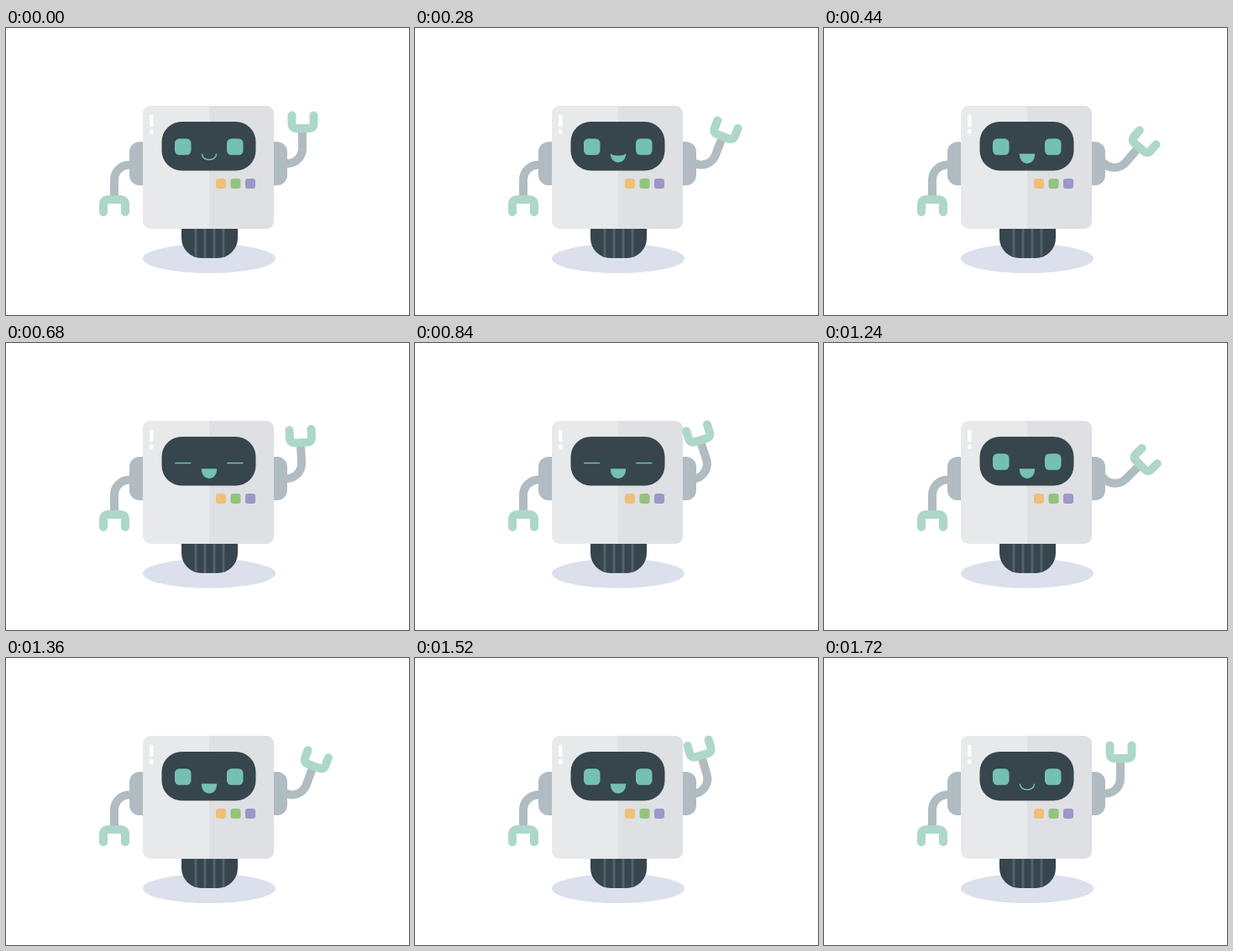
An HTML page that plays this animation: 480x343 px, repeating every 1920 ms.

```html
<!DOCTYPE html>
<html lang="en">
<head>
<meta charset="utf-8">
<title>Waving robot</title>
<style>
  html, body { margin: 0; width: 100%; height: 100%; overflow: hidden; background: #fff; }
  svg { display: block; width: 100vw; height: 100vh; }
  .dark { fill: #37454d; }
  .pad { fill: #b0bcc2; }
  .teal { fill: #74c1b3; }
  .limb, .claw { fill: none; stroke-width: 10; }
  .limb { stroke: #b0bcc2; }
  .claw { stroke: #add7c8; stroke-linecap: round; }
  #mouth { fill: #74c1b3; stroke: #74c1b3; stroke-width: 1.5; stroke-linecap: round; stroke-linejoin: round; }
</style>
</head>
<body>
<svg viewBox="0 0 480 343">
  <ellipse cx="242" cy="275.5" rx="79" ry="17.5" fill="#dbe0ec"/>

  <path class="dark" d="M209 236H276V251a24 24 0 0 1-24 24H233a24 24 0 0 1-24-24Z"/>
  <path d="M226 239V274M237 239V275M248 239V275M259 239V274" stroke="#53626a" stroke-width="3"/>

  <path class="pad" d="M164 136H159a12 12 0 0 0-12 12V176a12 12 0 0 0 12 12H164Z"/>
  <path class="pad" d="M318 136H323a12 12 0 0 1 12 12V176a12 12 0 0 1-12 12H318Z"/>

  <path class="limb" d="M152 163.5H147A18 18 0 0 0 129 181.500V205"/>
  <path class="claw" d="M116 220V211q0-6 6-6H136q6 0 6 6V220"/>

  <rect x="163" y="93" width="156" height="147" rx="9" fill="#e8e9eb"/>
  <path d="M242 93H310a9 9 0 0 1 9 9V231a9 9 0 0 1-9 9H242Z" fill="#dfe0e4"/>
  <g fill="#fff">
    <rect x="171" y="104" width="4.500" height="14" rx="1"/>
    <rect x="171" y="121" width="4.500" height="5.500" rx="1.500"/>
  </g>

  <rect class="dark" x="185.500" y="112" width="112" height="58.500" rx="24"/>
  <rect class="teal eye" x="201" width="19.500"/>
  <rect class="teal eye" x="263" width="19.500"/>
  <path id="mouth"/>

  <rect x="250" y="180" width="12" height="12" rx="3" fill="#f0c078"/>
  <rect x="267.500" y="180" width="12" height="12" rx="3" fill="#93c47d"/>
  <rect x="285" y="180" width="12" height="12" rx="3" fill="#9b97c8"/>

  <g id="arm">
    <path class="limb" d="M328 162H335A18 18 0 0 0 353 144V120"/>
    <path class="claw" d="M340.500 104.500V114q0 6 6 6H360.500q6 0 6-6V104.500"/>
  </g>
</svg>
<script>
  const LOOP = 1920, STEP = 40;

  // Tracks of [time in ms, value], eased between neighbours.
  const swing = [[160, 0], [400, 42], [820, -18], [1200, 47], [1560, -18], [1720, 0]];
  const lids = [[520, 1], [640, 0], [900, 0], [1020, 1]];
  const grin = [[160, 0], [360, 1], [1540, 1], [1720, 0]];

  const arm = document.getElementById('arm');
  const mouth = document.getElementById('mouth');
  const eyes = document.querySelectorAll('.eye');

  function valueAt(track, t) {
    const next = track.findIndex(key => key[0] > t);
    if (next < 0) return track[track.length - 1][1];
    if (next === 0) return track[0][1];
    const [t0, a] = track[next - 1];
    const [t1, b] = track[next];
    return a + (b - a) * (1 - Math.cos(Math.PI * (t - t0) / (t1 - t0))) / 2;
  }

  function draw(now) {
    // The movement advances at 25 poses per second.
    const t = Math.floor((now % LOOP) / STEP) * STEP;

    arm.setAttribute('transform', `rotate(${valueAt(swing, t)} 334 161)`);

    const open = valueAt(lids, t);
    const height = 1.5 + 18 * open;
    for (const eye of eyes) {
      eye.setAttribute('y', 142 + 1.5 * (1 - open) - height / 2);
      eye.setAttribute('height', height);
      eye.setAttribute('rx', Math.min(5.5, height / 2));
    }

    const m = valueAt(grin, t);
    const top = 151 + 8.5 * (1 - m);
    const low = 159.5 + 5.2 * m;
    mouth.setAttribute('d',
      `M233.5 151C234 ${top} 250 ${top} 250.5 151C250 ${low} 234 ${low} 233.5 151Z`);

    requestAnimationFrame(draw);
  }

  draw(performance.now());
</script>
</body>
</html>
```
